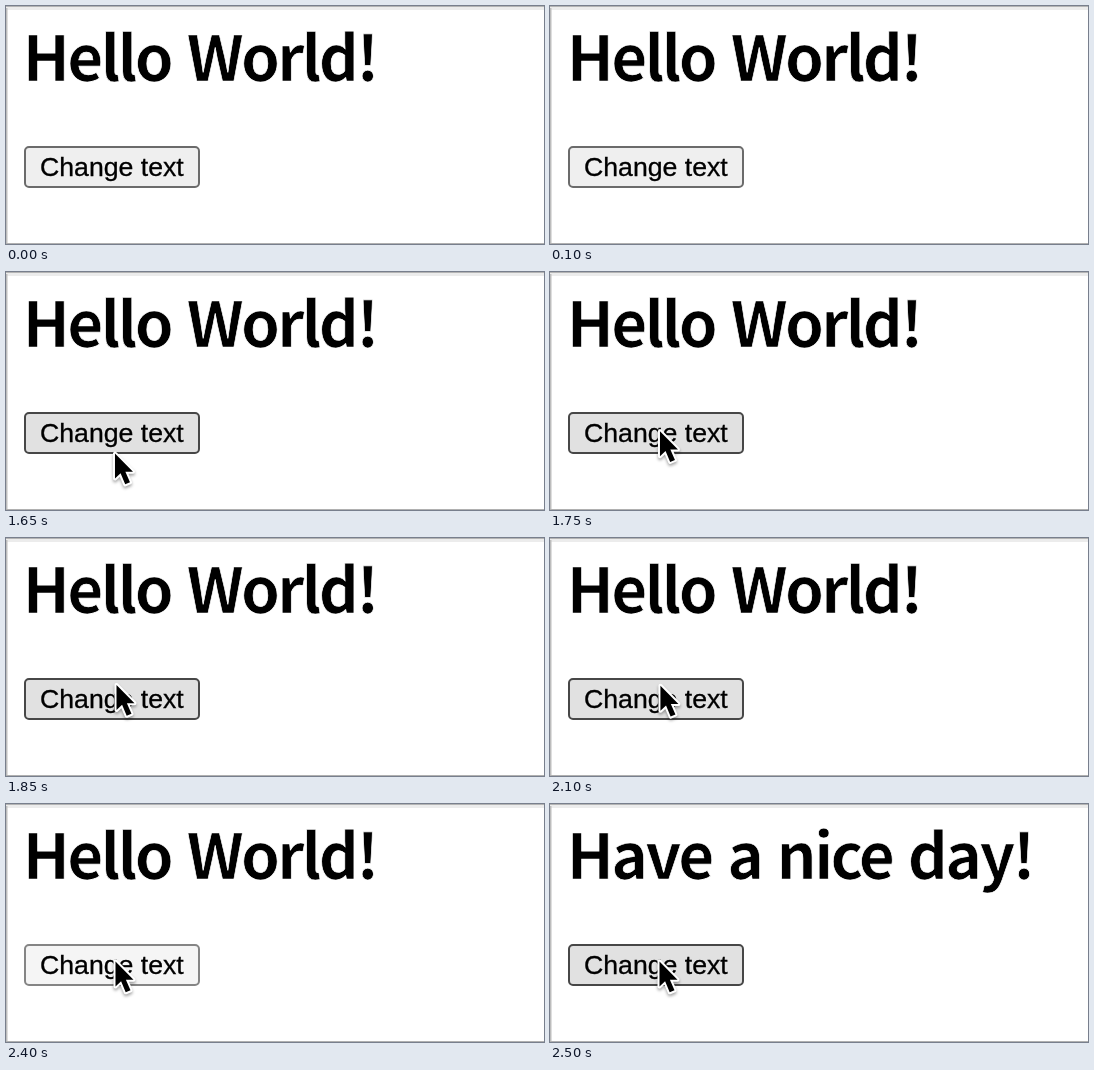
Write an HTML page that moves like this. It is 538x238 px and loops after 4400 ms.

```html
<!DOCTYPE html>
<html lang="en">
<head>
<meta charset="utf-8">
<title>Change text</title>
<style>
  html, body { margin: 0; width: 100%; height: 100%; overflow: hidden; background: #fff; }
  svg { display: block; width: 538px; height: 238px; }
  /* The thin white outline lightens the bold weight a little. */
  #title {
    font: 700 62.2px "Noto Sans CJK SC", "Noto Sans CJK JP", "Noto Sans CJK", "Noto Sans", sans-serif;
    letter-spacing: -2.6px; word-spacing: 4px; stroke: #fff; stroke-width: .7px;
  }
  #label { font: 26.67px "Liberation Sans", Arial, sans-serif; stroke: #000; stroke-width: .3px; }
  #cursor { filter: drop-shadow(0 2px 1.5px rgba(0, 0, 0, .35)); }
</style>
</head>
<body>
<svg viewBox="0 0 538 238">
  <rect width="538" height="238" fill="#fff"/>
  <rect width="538" height="4" fill="#ececec"/>
  <rect width="538" height="1" fill="#b4b4b4"/>
  <rect y="2" width="1.5" height="236" fill="#bdbdbd"/>
  <rect y="237" width="538" height="1" fill="#b0b0b0"/>
  <text id="title" x="16.8" y="75.3"></text>
  <rect id="button" x="19" y="141" width="174" height="40" rx="4" stroke-width="2"/>
  <text id="label" x="34" y="170">Change text</text>
  <g id="cursor">
    <path d="M0 0V25L5.6 19.8L10.2 30.8L15 28.8L10.4 18.2H18Z"
      stroke="#fff" stroke-width="4" stroke-linejoin="round" paint-order="stroke"/>
  </g>
</svg>
<script>
const LOOP = 4400, STEP = 50;
const ENTER = 1500, ARRIVE = 1850, SETTLE = 2050, REST = 2350, PRESS = 2400, RELEASE = 2500;
const styles = {
  idle: ["#efefef", "#6b6b6b"],
  hover: ["#e1e1e1", "#474747"],
  active: ["#f5f5f5", "#858585"]
};
const [title, button, cursor] = ["title", "button", "cursor"].map(id => document.getElementById(id));

const progress = (t, from, to) => Math.min(1, Math.max(0, (t - from) / (to - from)));
const smooth = p => p * p * (3 - 2 * p);

function cursorAt(t) {
  const rise = 1 - (1 - progress(t, ENTER, ARRIVE)) ** 1.5;
  const sink = smooth(progress(t, SETTLE, REST));
  return [107 + 3.5 * rise - sink, 227 - 80 * rise + 10.5 * sink];
}

function draw(time) {
  const t = Math.floor(time % LOOP / STEP) * STEP;
  const [x, y] = cursorAt(t);
  const pressed = t >= PRESS && t < RELEASE;
  const state = pressed ? "active" : y < 182 ? "hover" : "idle";
  const [fill, stroke] = styles[state];
  button.setAttribute("fill", fill);
  button.setAttribute("stroke", stroke);
  title.textContent = t < RELEASE ? "Hello World!" : "Have a nice day!";
  cursor.setAttribute("visibility", t < ENTER ? "hidden" : "visible");
  cursor.setAttribute("transform", `translate(${x} ${y})`);
}

const start = performance.now();
function tick() {
  draw(performance.now() - start);
  requestAnimationFrame(tick);
}
tick();
</script>
</body>
</html>
```
